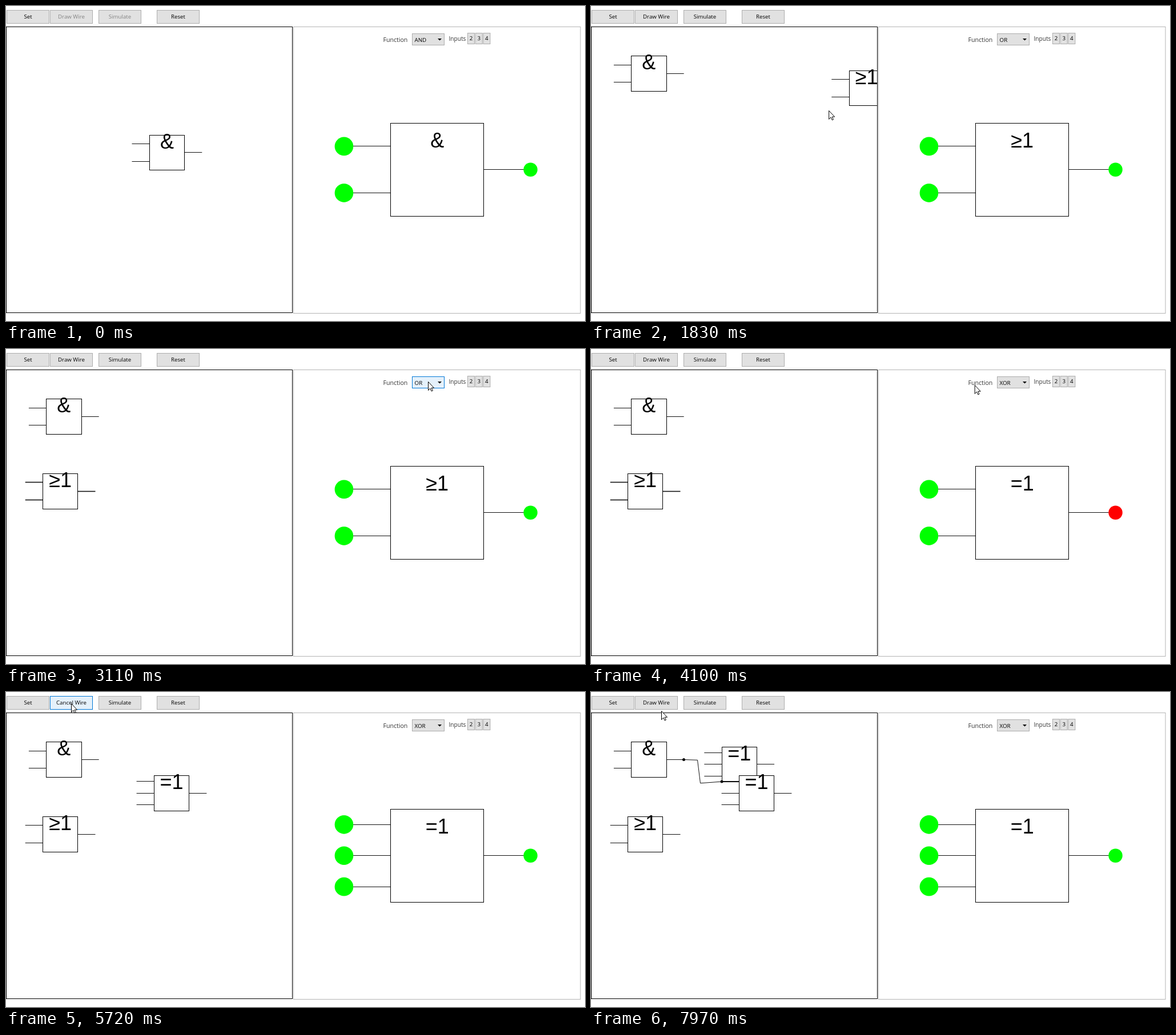
An HTML page with a canvas for the animation above (8 s loop, 1014 by 552 pixels).

```html
<!DOCTYPE html>
<html>
<head>
<meta charset="utf-8">
<style>
  html, body { margin: 0; width: 100%; height: 100%; overflow: hidden; background: #fff; }
  canvas { display: block; }
</style>
</head>
<body>
<canvas id="stage" width="1014" height="552"></canvas>
<script>
const ctx = document.getElementById('stage').getContext('2d');
const LOOP = 8000, SIZE = 61.4, BIG = 163.3;
const UI = '"Open Sans", "Noto Sans", sans-serif';
const SYMBOL = '36px "Liberation Sans", Arial, sans-serif';
const FUNCTIONS = ['AND', 'NAND', 'OR', 'NOR', 'XOR', 'XNOR'];

// Mouse stops: arrival time, x, y, pause
const STOPS = [
  [60, 519, 402], [330, 110, 165], [420, 71, 149, 150], [720, 38, 20, 70],
  [1170, 739, 56, 60], [1410, 740, 109, 150], [2150, 35, 270], [2300, 65, 281, 90],
  [2600, 38, 20, 80], [3080, 739, 57, 150], [3410, 756, 149, 480], [4100, 671, 63],
  [4330, 827, 57, 90], [4670, 345, 248], [4940, 260, 207], [4970, 260, 209],
  [5060, 259, 208, 70], [5400, 38, 20, 110], [5650, 114, 20, 130], [6200, 162, 118, 120],
  [6480, 186, 119, 90], [6740, 193, 160, 150], [7020, 229, 157, 70], [7310, 45, 21, 90],
  [7770, 164, 241], [7970, 123, 33]
];

// Each gate follows the mouse from `enter` to `drop`; `set`..`clear` draws its pins twice.
const GATES = [
  { sym: '&', n: 2, x: 70.6, y: 149.3, enter: 0, drop: 420, set: 750, clear: 1790 },
  { sym: '≥1', n: 2, x: 64.4, y: 280, enter: 1790, drop: 2360, set: 2640, clear: 4590 },
  { sym: '=1', n: 3, x: 259.3, y: 208, enter: 4590, drop: 5050, set: 5450, clear: 5720 }
];
const WIRE = { start: 6250, bend: 6520, end: 7050 };

const snap = v => Math.floor(v) + 0.5;

function mouse(t) {
  const i = Math.max(1, STOPS.findLastIndex(s => s[0] <= t) + 1);
  const [t0, x0, y0, pause = 0] = STOPS[i - 1];
  const [t1, x1, y1] = STOPS[i] || [LOOP, x0, y0];
  const k = Math.max(0, (t - t0 - pause) / (t1 - t0 - pause));
  return [x0 + (x1 - x0) * k, y0 + (y1 - y0) * k];
}

function box(x, y, w, h, fill, stroke) {
  ctx.fillStyle = fill;
  ctx.strokeStyle = stroke;
  ctx.lineWidth = 1;
  ctx.fillRect(x, y, w, h);
  ctx.strokeRect(x, y, w, h);
}

function line(points, width = 1) {
  ctx.beginPath();
  points.forEach(p => ctx.lineTo(...p));
  ctx.lineWidth = width;
  ctx.strokeStyle = '#111';
  ctx.stroke();
}

function dot(x, y, r, color) {
  ctx.beginPath();
  ctx.arc(x, y, r, 0, 7);
  ctx.fillStyle = color;
  ctx.fill();
}

function text(s, x, y, font, color = '#000', align = 'center') {
  ctx.font = font;
  ctx.fillStyle = color;
  ctx.textAlign = align;
  ctx.fillText(s, x, y);
}

const label = (s, x, y, size, color, align) => text(s, x, y, `${size}px ${UI}`, color, align);

// Gate with its lower left corner at x, y
function gate(sym, n, x, y, size, baseline, pinWidth) {
  const top = y - size, half = size / 2, left = snap(x), right = snap(x + size);
  for (let i = 0; i < n; i++) {
    const py = snap(top + size * (i + 0.5) / n);
    line([[x - half, py], [left, py]], pinWidth);
  }
  const oy = snap(top + half);
  line([[right, oy], [x + size + half, oy]], pinWidth);
  box(left, snap(top), right - left, snap(y) - snap(top), '#fff', '#000');
  text(sym, x + half, top + baseline, SYMBOL);
}

function button(s, x, y, w, h, [mx, my], size, enabled = true) {
  const hot = enabled && mx >= x && mx <= x + w && my >= y && my <= y + h;
  box(x, y, w, h, hot ? '#e5f1fb' : '#e1e1e1', hot ? '#0078d7' : '#adadad');
  label(s, x + w / 2, y + h / 2 + 3.3, size, enabled ? '#000' : '#838383');
}

function comboBox(value, open, [mx, my]) {
  const hot = mx >= 711 && mx <= 767 && my >= 48 && my <= 69;
  box(711.5, 48.5, 56, 20, open ? '#cce4f7' : hot ? '#e5f1fb' : '#e1e1e1',
      open ? '#005499' : hot ? '#0078d7' : '#adadad');
  label(value, 715.5, 62.5, 9.8, '#000', 'left');
  ctx.beginPath();
  ctx.moveTo(756, 57);
  ctx.lineTo(763, 57);
  ctx.lineTo(759.5, 60.5);
  ctx.fill();
  if (!open) return;
  box(710.5, 69.5, 57, 102, '#fff', '#646464');
  const row = my < 70 ? FUNCTIONS.indexOf(value) : Math.floor((my - 70) / 17);
  FUNCTIONS.forEach((name, i) => {
    const y = 70 + i * 17;
    if (i === row) {
      ctx.fillStyle = '#0078d7';
      ctx.fillRect(711, y, 56, 17);
    }
    label(name, 714, y + 12, 9.8, i === row ? '#fff' : '#000', 'left');
  });
}

function wire(t) {
  const points = [[162.5, 118.5]];
  if (t >= WIRE.bend) points.push([186.5, 119.3]);
  if (t >= WIRE.end) {
    points.push([191.5, 159.8], [229, 157]);
    dot(229, 157, 2.5, '#000');
  } else {
    const [x, y] = mouse(t);
    points.push([x - 1.5, y - 0.5]);
  }
  line(points);
  dot(162.5, 118.5, 2.5, '#000');
}

function workspace(t) {
  box(0.5, 36.5, 501, 501, '#fff', '#000');
  ctx.save();
  ctx.beginPath();
  ctx.rect(1, 37, 500, 500);
  ctx.clip();
  if (t >= WIRE.end) gate('=1', 3, 229, 157.4, SIZE, 23.5, 1);
  for (const g of GATES) {
    if (t < g.enter) continue;
    let { x, y } = g;
    if (t < 120) [x, y] = [251.2, 287.5];
    else if (t < g.drop) [x, y] = mouse(t - 30);
    gate(g.sym, g.n, x, y, SIZE, 23.5, t >= g.set && t < g.clear ? 1.6 : 1);
  }
  if (t >= WIRE.start) wire(t);
  ctx.restore();
}

function preview(t, m) {
  const [value, sym] = t < 1560 ? ['AND', '&'] : t < 3890 ? ['OR', '≥1'] : ['XOR', '=1'];
  const n = t < 4380 ? 2 : 3, x = 673.6, y = 368.4, top = y - BIG;
  box(503.5, 36.5, 502.5, 502, '#fff', '#b4b4b4');
  gate(sym, n, x, y, BIG, 43.2, 1);
  for (let i = 0; i < n; i++) dot(x - BIG / 2, top + BIG * (i + 0.5) / n, BIG / 10, '#0f0');
  dot(x + BIG * 1.5, top + BIG / 2, BIG * 0.075, value === 'XOR' && n === 2 ? '#f00' : '#0f0');

  label('Function', 660.5, 63, 10.6, '#333', 'left');
  label('Inputs', 775.5, 60.5, 10.1, '#333', 'left');
  [2, 3, 4].forEach((d, i) => button(d, 808.5 + i * 13.7, 47.5, 12, 19, m, 9.8));
  const open = (t >= 1230 && t < 1560) || (t >= 3230 && t < 3890);
  comboBox(value, open, m);
}

function pointer([x, y]) {
  ctx.save();
  ctx.translate(x + 0.5, y + 0.5);
  const arrow = new Path2D('M0 0V15L3.3 11.5L5.7 16.5L7.8 15.5L5.6 10.7H10Z');
  ctx.fillStyle = '#fff';
  ctx.fill(arrow);
  ctx.strokeStyle = '#000';
  ctx.lineWidth = 1;
  ctx.stroke(arrow);
  ctx.restore();
}

function draw(t) {
  const shown = t >= 60, m = shown ? mouse(t) : [-99, -99], ready = t >= 750;
  ctx.fillStyle = '#fff';
  ctx.fillRect(0, 0, 1014, 552);
  workspace(t);
  preview(t, m);
  const wiring = t >= 5720 && t < WIRE.end;
  const tool = (s, x, enabled) => button(s, x, 7.5, 74, 23, m, 9.7, enabled);
  tool('Set', 1.5);
  tool(wiring ? 'Cancel Wire' : 'Draw Wire', 77.5, ready);
  tool('Simulate', 162.5, ready);
  tool('Reset', 264.5);
  if (shown) pointer(m);
}

const start = performance.now();
function tick() {
  draw((performance.now() - start) % LOOP);
  requestAnimationFrame(tick);
}
tick();
</script>
</body>
</html>
```
